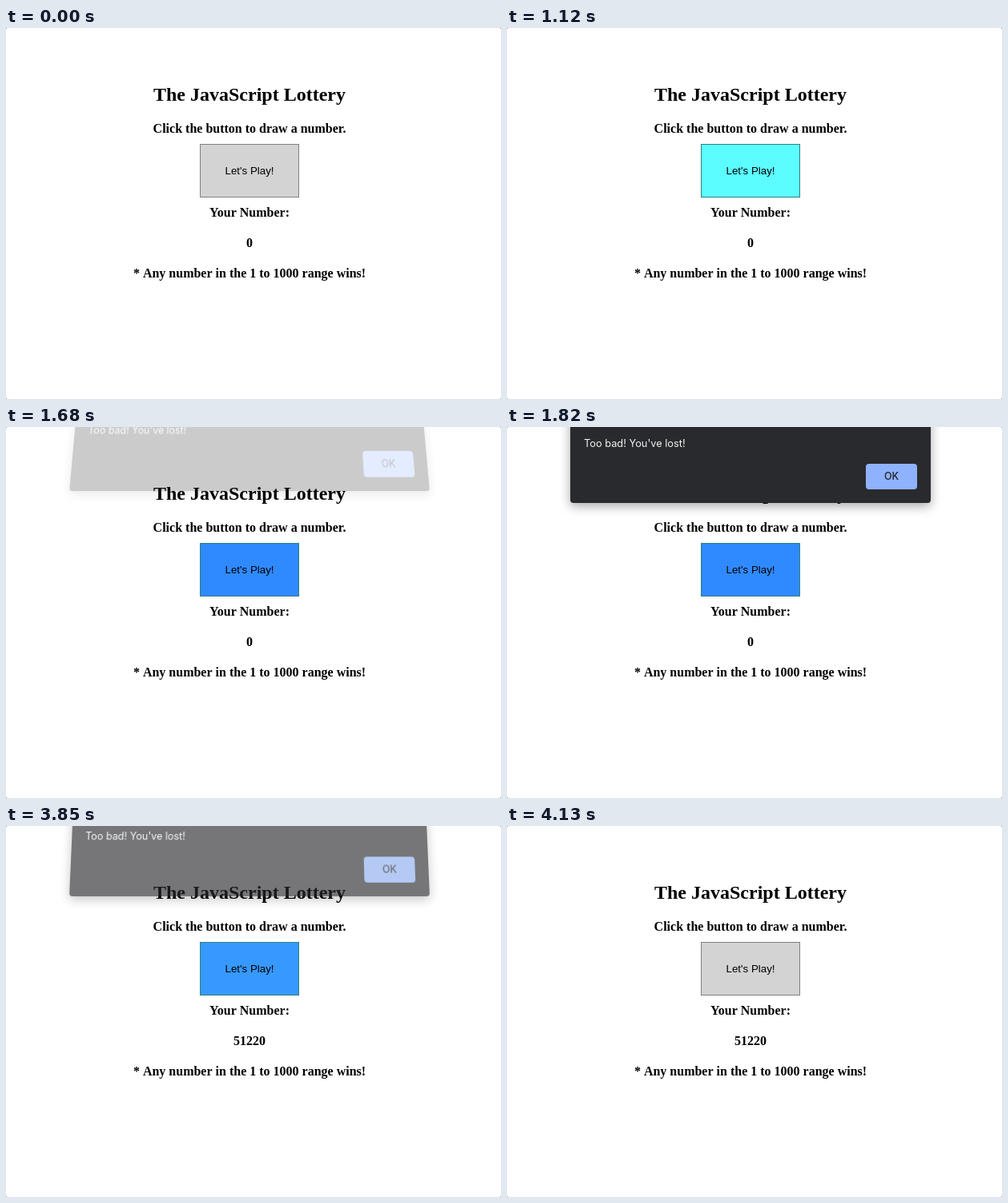
An HTML page with a canvas that plays this animation: 618 px wide and 464 px high, repeating every 5110 ms.

```html
<!DOCTYPE html>
<html lang="en">
<head>
<meta charset="utf-8">
<title>The JavaScript Lottery</title>
<style>
  html, body { margin: 0; width: 100%; height: 100%; overflow: hidden; background: #fff; }
  canvas { display: block; }
</style>
</head>
<body>
<canvas id="stage" width="618" height="464"></canvas>
<script>
const W = 618, H = 464, LOOP = 5110, TICK = 70, MID = 304;
const SERIF = '"Liberation Serif", "Times New Roman", serif';
const SANS = '"Liberation Sans", Arial, sans-serif';
const UI = 'Inter, sans-serif';
const DIALOG = { x: 79, w: 450, bottom: 95 };

const ctx = document.getElementById('stage').getContext('2d');
const layer = document.createElement('canvas');
layer.width = W;
layer.height = 120;
const dlg = layer.getContext('2d');

// Button states: start time, fill, share of teal in the border
const buttonSteps = [
  [0, '#d3d3d3', 0],
  [770, '#9ee0e0', 0.25],
  [840, '#64f5f7', 0.82],
  [910, '#5cfdff', 1],
  [1540, '#47c7ff', 1],
  [1610, '#3595ff', 1],
  [1680, '#308aff', 1],
  [3850, '#3799ff', 1],
  [3920, '#4fdcff', 1],
  [3990, '#96e0e4', 0.5],
  [4060, '#cbd5d6', 0.08],
  [4130, '#d3d3d3', 0]
];

const clamp = v => Math.min(1, Math.max(0, v));
const mix = (a, b, k) => Math.round(a + (b - a) * k);

function text(c, str, x, y, font, color, align = 'center') {
  c.font = font;
  c.fillStyle = color;
  c.textAlign = align;
  c.fillText(str, x, y);
}

function drawButton(t) {
  const [, fill, teal] = buttonSteps.findLast(step => step[0] <= t);
  ctx.fillStyle = `rgb(${mix(128, 46, teal)}, 128, 128)`;
  ctx.fillRect(242, 145, 124, 67);
  ctx.fillStyle = fill;
  ctx.fillRect(243, 146, 122, 65);
  text(ctx, "Let's Play!", MID, 183, `13.333px ${SANS}`, '#000');
}

function drawPage(t) {
  ctx.fillStyle = '#fff';
  ctx.fillRect(0, 0, W, H);
  const bold = `bold 16px ${SERIF}`;
  text(ctx, 'The JavaScript Lottery', MID, 91, `bold 24px ${SERIF}`, '#000');
  text(ctx, 'Click the button to draw a number.', MID, 131, bold, '#000');
  drawButton(t);
  text(ctx, 'Your Number:', MID, 236, bold, '#000');
  text(ctx, t < 3850 ? '0' : '51220', MID, 274, bold, '#000');
  text(ctx, '* Any number in the 1 to 1000 range wins!', MID, 312, bold, '#000');
}

function paintDialog(hovered) {
  dlg.clearRect(0, 0, W, layer.height);
  dlg.save();
  dlg.shadowColor = 'rgba(0, 0, 0, 0.35)';
  dlg.shadowBlur = 14;
  dlg.shadowOffsetY = 4;
  dlg.fillStyle = '#292a2d';
  dlg.beginPath();
  dlg.roundRect(DIALOG.x, -20, DIALOG.w, DIALOG.bottom + 20, 4);
  dlg.fill();
  dlg.restore();
  text(dlg, "Too bad! You've lost!", 96, 25, `12.8px ${UI}`, '#f1f3f4', 'left');
  dlg.fillStyle = hovered ? '#8aacee' : '#8fb2ff';
  dlg.beginPath();
  dlg.roundRect(448, 46, 64, 32, 4);
  dlg.fill();
  text(dlg, 'OK', 480, 66, `500 12.5px ${UI}`, '#202124');
}

// hidden: 0 = fully open, 1 = gone; the sheet leans back while it fades
function drawDialog(t) {
  const hidden = t < 2500 ? 1 - clamp((t - 1640) / 165) : clamp((t - 3765) / 236);
  if (hidden >= 1) return;
  paintDialog(t >= 3220);
  ctx.save();
  ctx.globalAlpha = 1 - hidden;
  if (hidden === 0) {
    ctx.drawImage(layer, 0, 0);
  } else {
    const tilt = hidden / 0.66;
    for (let y = 0; y < layer.height; y++) {
      const source = (y + 14.9 * tilt) / (1 + 0.02 * tilt);
      if (source > layer.height - 1) break;
      const scale = 1 - (DIALOG.bottom - source) * 0.00036 * tilt;
      ctx.drawImage(layer, 0, source, W, 1, MID * (1 - scale), y, W * scale, 1);
    }
  }
  ctx.restore();
}

function drawCorners() {
  ctx.fillStyle = 'rgba(0, 0, 0, 0.45)';
  for (const x of [0, W - 1])
    for (const y of [0, H - 1]) ctx.fillRect(x, y, 1, 1);
}

function frame() {
  const t = Math.floor((performance.now() % LOOP) / TICK) * TICK;
  drawPage(t);
  drawDialog(t);
  drawCorners();
  requestAnimationFrame(frame);
}
frame();
</script>
</body>
</html>
```
